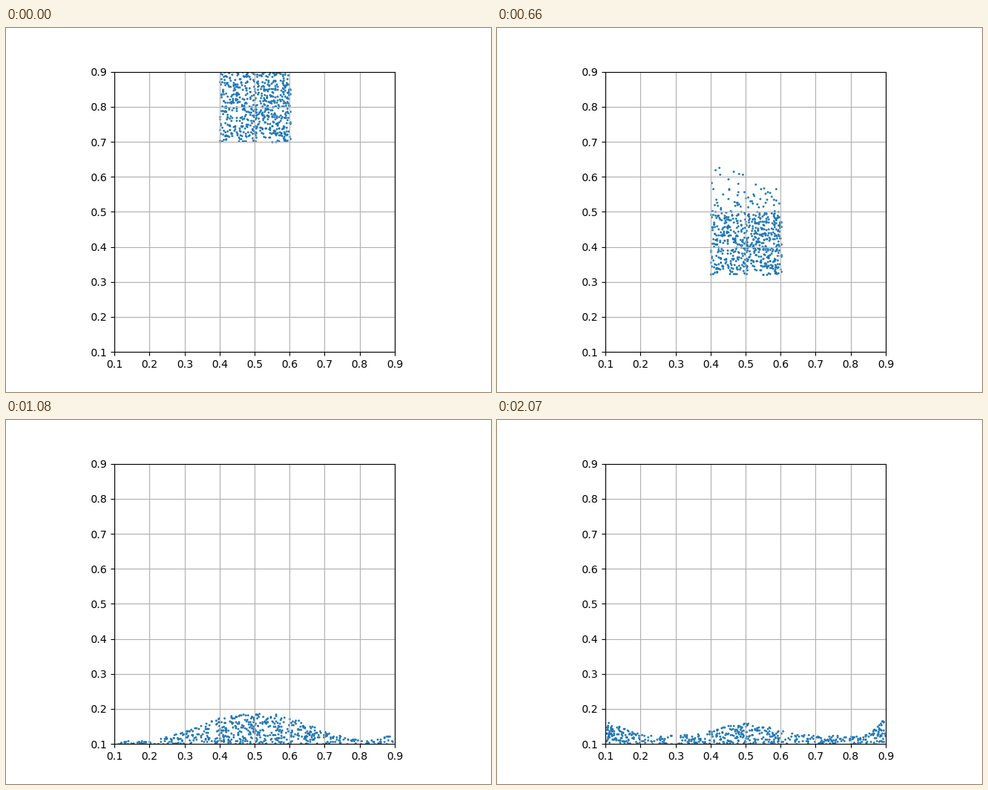
Animation of 640x480 px, one loop 2.1 s. Source, as a matplotlib script:

```python
import numpy as np
import matplotlib.pyplot as plt
from matplotlib.animation import FuncAnimation

FRAMES, INTERVAL = 70, 30
COUNT = 630
G = 0.000783            # fall per squared frame
FLOOR = 0.092
LANDED = 36             # the whole block has collapsed by then

rng = np.random.default_rng(4)


def bump(x, center, width, power=2):
    return np.exp(-np.abs((x - center) / width) ** power)


def hump(x):
    """Water surface right after the collapse."""
    return 0.108 + 0.08 * bump(x, 0.5, 0.2, 2.5) + 0.02 * bump(x, 0.9, 0.04)


def rest(x):
    """Water surface once it has settled."""
    return (0.124 + 0.036 * bump(x, 0.5, 0.11) + 0.038 * bump(x, 0.1, 0.07)
            + 0.054 * bump(x, 0.9, 0.035))


def spread(surface, rank, level):
    """Fill the area under a surface evenly."""
    x = np.linspace(0.1, 0.9, 801)
    depth = surface(x) - FLOOR
    area = np.cumsum(depth)
    px = np.interp(rank, (area - area[0]) / (area[-1] - area[0]), x)
    return px, FLOOR + level * np.interp(px, x, depth)


# Initial block; its top layer starts to fall late, most of all on the left
x0 = rng.uniform(0.4, 0.602, COUNT)
y0 = rng.uniform(0.7, 0.9, COUNT)
delay = (3.9 - 13 * (x0 - 0.4)) * np.clip((y0 - 0.865) / 0.035, 0, 1) ** 4.4

# Low particles are squeezed outwards, high ones end up on top
order = np.argsort((x0 - 0.5) * (1 - 3 * (y0 - 0.7)))
rank = np.empty(COUNT)
rank[order] = np.sort(rng.random(COUNT))
level = np.empty(COUNT)
for column in np.array_split(order, 30):
    place = np.argsort(np.argsort(y0[column]))
    level[column] = np.sort(rng.random(len(column)))[place]

hump_x, hump_y = spread(hump, rank, level)
rest_x, rest_y = spread(rest, rank, level)
contact = delay + np.sqrt((y0 - hump_y) / G)


def positions(n):
    if n <= LANDED:
        t = np.clip((n - contact) / (LANDED - contact), 0, 1)
        x = x0 + (hump_x - x0) * (1 - (1 - t) ** 1.5)
        y = np.maximum(y0 - G * np.maximum(n - delay, 0) ** 2, hump_y)
    else:
        b = 1 - np.exp(-(n - LANDED) / 4.5)
        x = hump_x + (rest_x - hump_x) * b
        y = hump_y + (rest_y - hump_y) * b
        y -= 0.00035 * max(n - 51, 0) * level * bump(x, 0.9, 0.03)
    return np.column_stack([x, y])


fig = plt.figure(figsize=(6.4, 4.8), dpi=100)
ax = fig.add_subplot()
ax.set_aspect("equal")
ax.set(xlim=(0.1, 0.9), ylim=(0.1, 0.9))
ticks = np.linspace(0.1, 0.9, 9)
ax.set_xticks(ticks)
ax.set_yticks(ticks)
ax.grid(True)
dots = ax.scatter(x0, y0, s=1, color="C0")


def update(n):
    dots.set_offsets(positions(n))
    return dots,


anim = FuncAnimation(fig, update, frames=FRAMES, interval=INTERVAL,
                     repeat=True, repeat_delay=0, blit=False)
plt.show()
```
